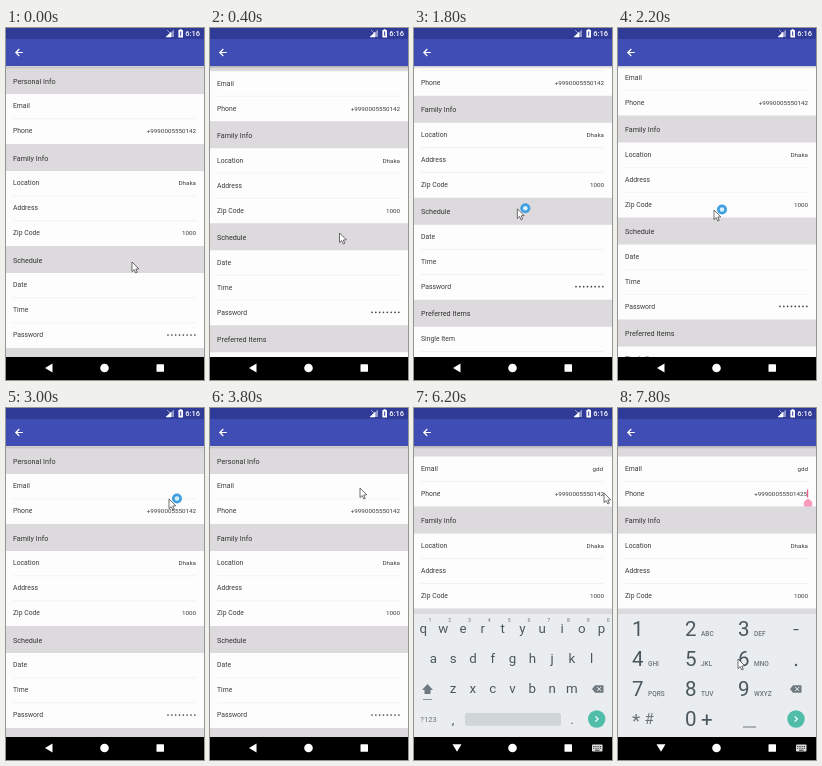
An HTML page with a canvas that plays this animation: 198 px wide and 352 px high, repeating every 8 s.

```html
<!DOCTYPE html>
<html lang="en">
<head>
<meta charset="utf-8">
<title>Form demo</title>
<style>
  html, body { margin: 0; width: 100%; height: 100%; overflow: hidden; background: #000; }
  canvas { display: block; width: 100vw; height: 100vh; }
</style>
</head>
<body>
<canvas></canvas>
<script>
const W = 198, H = 352, LOOP = 8000, STEP = 200;
const BAR_BOTTOM = 38, KEYS_TOP = 206, NAV_TOP = 329;
const HEADER = 27, ROW = 25, MAX_SCROLL = 68, KEY_GAP = 19.8, KEY_ROW = 30;
const PINK = '#ee5a90', KEY_INK = '#4a575e', SOFT_INK = '#6a757b', KEY_BG = '#eaedf0';
const canvas = document.querySelector('canvas');
const ctx = canvas.getContext('2d');

const PHONE = '+9990005550142';
const SECTIONS = [
  ['Personal Info', 'Email', 'Phone'],
  ['Family Info', 'Location', 'Address', 'Zip Code'],
  ['Schedule', 'Date', 'Time', 'Password'],
  ['Preferred Items', 'Single Item', 'Multi Items'],
];
const LETTER_ROWS = ['qwertyuiop', 'asdfghjkl', 'zxcvbnm'];
const DIGIT_LABELS = ['', 'ABC', 'DEF', 'GHI', 'JKL', 'MNO', 'PQRS', 'TUV', 'WXYZ'];

const rowY = row => KEYS_TOP + KEY_ROW * (row + 0.5);
const letterX = (row, i) => W / 2 - 0.5 + (i - (LETTER_ROWS[row].length - 1) / 2) * KEY_GAP;

// Where the mouse rests: [time, x, y]
const POINTER = [
  [0, 126, 234], [800, 133, 176], [2200, 96, 182], [3000, 163, 91], [3800, 150, 80],
  [4600, 101, 227], [5200, letterX(1, 2), rowY(1)], [5600, letterX(1, 2), rowY(1)],
  [6200, 190, 85], [6600, 190, 85], [7400, 62, rowY(1)], [7800, 120, rowY(1)],
];

const progress = (t, from, to) => Math.min(1, Math.max(0, (t - from) / (to - from)));
const smooth = k => k * k * (3 - 2 * k);

function scrollAt(t) {
  const flick = progress(t, 200, 800) - progress(t, 1400, 2780);
  return MAX_SCROLL * flick + 17.5 * progress(t, 4200, 4400);
}

function pointerAt(t) {
  const next = Math.max(1, POINTER.findIndex(p => p[0] >= t));
  const [t0, x0, y0] = POINTER[next - 1], [t1, x1, y1] = POINTER[next];
  const k = smooth(progress(t, t0, t1));
  return [x0 + (x1 - x0) * k, y0 + (y1 - y0) * k];
}

function rect(x, y, w, h, color, radius = 0) {
  ctx.fillStyle = color;
  ctx.beginPath();
  ctx.roundRect(x, y, w, h, radius);
  ctx.fill();
}

function circle(x, y, r, color) {
  ctx.fillStyle = color;
  ctx.beginPath();
  ctx.arc(x, y, r, 0, Math.PI * 2);
  ctx.fill();
}

// An SVG path placed at x, y
function shape(path, x, y, fill, stroke, width = 1) {
  const outline = new Path2D(path);
  ctx.save();
  ctx.translate(x, y);
  ctx.lineWidth = width;
  if (fill) { ctx.fillStyle = fill; ctx.fill(outline); }
  if (stroke) { ctx.strokeStyle = stroke; ctx.stroke(outline); }
  ctx.restore();
}

// y is the middle of the capital letters
function text(s, x, y, size, color, align = 'left', weight = 400) {
  ctx.font = `${weight} ${size}px Roboto, sans-serif`;
  ctx.textAlign = align;
  ctx.fillStyle = color;
  ctx.fillText(s, x, y + size * 0.355);
}

function drawCaret(y, withHandle) {
  rect(188.9, y - 4, 1.3, 8, PINK);
  if (withHandle) shape('M0-5.5 3.2-3A4.4 4.4 0 1 1-3.2-3Z', 190, y + 10.5, '#f79abb');
}

function drawForm(t) {
  rect(0, BAR_BOTTOM, W, NAV_TOP - BAR_BOTTOM, '#fefdfe');
  const values = {
    Email: 'gdd'.slice(0, Math.max(0, Math.floor((t - 4800) / STEP))),
    Phone: PHONE + (t >= 7600 ? '5' : ''),
    Location: 'Dhaka',
    'Zip Code': '1000',
  };
  const focused = t < 4200 ? '' : t < 6400 ? 'Email' : 'Phone';
  const caretOn = t % 1000 >= 500;
  let y = BAR_BOTTOM + 1 - scrollAt(t);
  for (const [title, ...rows] of SECTIONS) {
    rect(0, y, W, HEADER, '#dcdadc');
    text(title, 7, y + 14, 7.2, '#333');
    y += HEADER;
    rows.forEach((name, i) => {
      const mid = y + 12;
      text(name, 7, mid, 6.8, '#3b3b3b');
      if (name === 'Password') {
        for (let d = 0; d < 8; d++) circle(162 + d * 3.83, mid, 0.85, '#444');
      } else if (values[name]) {
        text(values[name], name === focused ? 189 : 190, mid, 6.25, '#3b3b3b', 'right');
      }
      if (name === focused && caretOn) drawCaret(mid, name === 'Phone');
      y += ROW;
      if (i < rows.length - 1) rect(7, y - 0.5, 183, 0.7, '#eeedef');
    });
  }
}

function drawBars() {
  const shadow = ctx.createLinearGradient(0, BAR_BOTTOM, 0, BAR_BOTTOM + 3);
  shadow.addColorStop(0, 'rgba(0,0,0,.2)');
  shadow.addColorStop(1, 'rgba(0,0,0,0)');
  rect(0, BAR_BOTTOM, W, 3, shadow);
  rect(0, 0, W, 11, '#303b98');
  rect(0, 11, W, BAR_BOTTOM - 11, '#404db4');
  shape('M7 0H0M3.5-3.5 0 0 3.5 3.5', 9.8, 24.5, null, '#fff', 1.2);

  shape('M0 0H8V-7.5Z', 160, 9, '#8e95cb');
  shape('M0 0H5V-4.7ZM1-7 4-4', 160, 9, '#fff', '#fff', 0.5);
  rect(172.4, 2, 4.6, 7.6, '#fff', 0.6);
  rect(173.7, 1.2, 2, 1, '#fff');
  rect(174.2, 3.5, 1, 4.2, '#303b98');
  text('6:16', 194, 5.8, 7.5, '#fff', 'right', 500);
}

function drawNav(keyboardUp) {
  rect(0, NAV_TOP, W, H - NAV_TOP, '#000');
  shape(keyboardUp ? 'M-4.5-3.7H4.5L0 3.8Z' : 'M3.5-4.5V4.5L-4 0Z', 43, 340, '#fff');
  circle(98.5, 340, 4.3, '#fff');
  rect(150.5, 336.3, 7.5, 7.5, '#fff', 0.6);
  if (!keyboardUp) return;
  rect(178, 336.5, 10.5, 7, '#ddd', 0.8);
  for (let i = 0; i < 8; i++) rect(179.2 + i % 4 * 2.2, 338 + (i >> 2) * 1.8, 1.1, 0.9, '#222');
  rect(181, 341.7, 4.5, 0.9, '#222');
}

function drawBackspace(x) {
  shape('M-6 0-3-3.8H5.5V3.8H-3Z', x, rowY(2), '#6f7a80');
  shape('M-2-2 2 2M2-2-2 2', x + 1.2, rowY(2), null, KEY_BG);
}

function drawEnter(x) {
  circle(x, rowY(3), 8.7, '#4fbda8');
  shape('M-1.3-2.7 1.4 0-1.3 2.7', x, rowY(3), null, '#fff', 1.2);
}

function drawLetters() {
  LETTER_ROWS.forEach((letters, row) => [...letters].forEach((c, i) => {
    const x = letterX(row, i), y = rowY(row);
    text(c, x, y - 0.5, 13.3, KEY_INK, 'center');
    if (row === 0) text((i + 1) % 10, x + 6.5, y - 9, 5.2, SOFT_INK, 'center');
  }));
  shape('M0-5 5.5 1H3V5H-3V1H-5.5Z', 13.5, rowY(2), '#6f7a80');
  rect(9, 291, 9, 0.9, '#7e888d');
  text('?123', 14.5, rowY(3), 7.6, SOFT_INK, 'center');
  text(',', 39, rowY(3), 13.3, KEY_INK, 'center');
  rect(51, 305, 96, 12.7, '#d0d5d8', 2);
  text('.', 158, rowY(3), 13.3, KEY_INK, 'center');
  drawBackspace(184);
  drawEnter(182.7);
}

function drawDigits() {
  DIGIT_LABELS.forEach((label, i) => {
    const x = 14 + i % 3 * 53, y = rowY(Math.floor(i / 3));
    text(i + 1, x, y, 20.5, KEY_INK);
    text(label, x + 16, y + 4.5, 6.5, SOFT_INK, 'left', 500);
  });
  text('*', 14, rowY(3) + 1.5, 19, SOFT_INK);
  text('#', 26.5, rowY(3), 15, SOFT_INK);
  text('0', 67, rowY(3), 20.5, KEY_INK);
  text('+', 83, rowY(3), 20.5, KEY_INK);
  rect(125, 318.5, 13, 1, SOFT_INK);
  rect(175.5, rowY(0), 5, 1.2, KEY_INK);
  circle(178, rowY(1) + 6, 1.2, KEY_INK);
  drawBackspace(178);
  drawEnter(178);
}

function drawKeyboard(t) {
  const height = NAV_TOP - KEYS_TOP;
  ctx.save();
  ctx.translate(0, height * (1 - progress(t, 4000, 4400)));
  rect(0, KEYS_TOP, W, height, KEY_BG);
  t >= 6800 ? drawDigits() : drawLetters();
  ctx.restore();
}

function drawPointer(t) {
  const [x, y] = pointerAt(t);
  shape('M0 0V9.6L2.2 7.6 3.8 11 5.3 10.3 3.8 7 6.8 6.8Z', x, y, '#fff', '#333', 0.7);
  if (t < 600 || t > 3200) return;
  circle(x + 8, y - 0.5, 5, '#3f9fe0');
  circle(x + 8, y - 0.5, 2.3, '#d8f0fb');
}

function draw(now) {
  const t = Math.floor(now % LOOP / STEP) * STEP;
  const ratio = window.devicePixelRatio || 1;
  const width = Math.round(innerWidth * ratio), height = Math.round(innerHeight * ratio);
  if (canvas.width !== width || canvas.height !== height) {
    canvas.width = width;
    canvas.height = height;
  }
  ctx.setTransform(width / W, 0, 0, height / H, 0, 0);
  const keyboardUp = t >= 4200;
  drawForm(t);
  drawBars();
  if (keyboardUp) drawKeyboard(t);
  drawNav(keyboardUp);
  drawPointer(t);
}

const start = performance.now();
function tick() {
  draw(performance.now() - start);
  requestAnimationFrame(tick);
}
tick();
</script>
</body>
</html>
```
